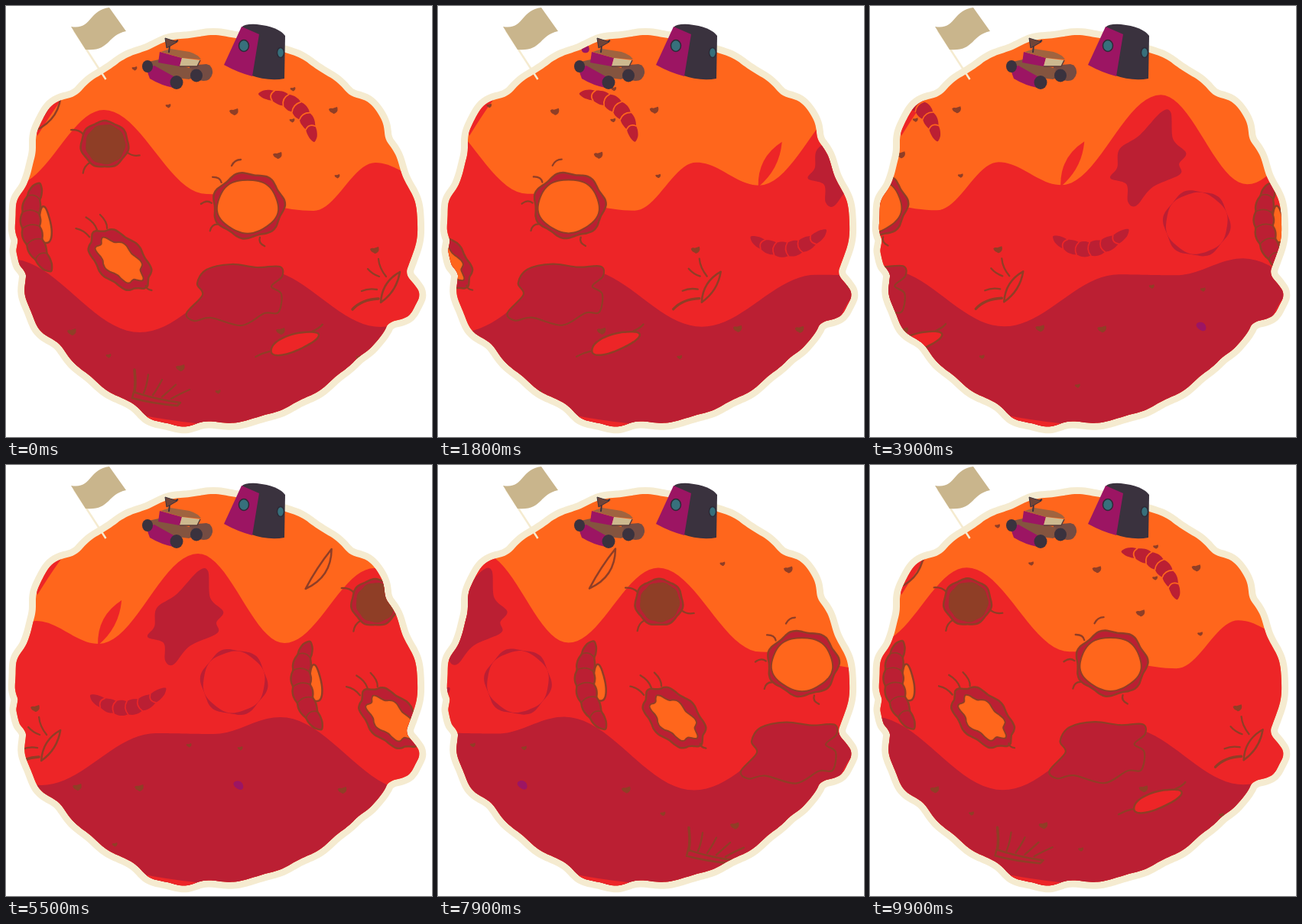
An HTML page that plays this animation: 557 px wide and 564 px high, repeating every 10 s.

```html
<!DOCTYPE html>
<html lang="en">
<head>
<meta charset="utf-8">
<title>Red planet</title>
<style>
  html, body { margin: 0; width: 100%; height: 100%; overflow: hidden; background: #fff; }
  svg { display: block; width: 557px; height: 564px; }
</style>
</head>
<body>
<svg viewBox="0 0 557 564">
  <defs><clipPath id="globe"></clipPath></defs>
  <g id="rim"></g>
  <g clip-path="url(#globe)">
    <rect width="557" height="564" fill="#ff661c"/>
    <g id="bands"></g>
    <g fill="#ed2527">
      <path d="M76 118Q62 136 41 170L30 130Z"/>
      <path d="M552 368Q532 388 523 416L557 416Z"/>
      <path d="M170 534Q210 542 248 546L246 564L170 560Z"/>
    </g>
    <g id="land"></g>
  </g>
  <g id="flag">
    <path d="M89 32L130.500 96" stroke="#f5ebd0" stroke-width="2.500"/>
    <path d="M85 27C112 32 108 5 135 2L157 33C132 38 136 60 104 57Z" fill="#c9b58c"/>
  </g>
  <g id="pod">
    <path d="M308 28Q312 23 328 24Q356 27 365 39L364 95Q343 99 318 90Z" fill="#3a323e"/>
    <path d="M308 27L331 37L322 92Q303 87 285 77Z" fill="#9c1563"/>
    <g fill="#37707c" stroke="#2e2a36" stroke-width="1.500">
      <ellipse cx="311" cy="52" rx="6.500" ry="7.500"/>
      <ellipse cx="359" cy="61" rx="4.500" ry="6.500"/>
    </g>
  </g>
  <g id="rover">
    <path d="M240 78L262 76Q271 78 270 88Q268 98 258 98L240 95Z" fill="#744c43"/>
    <path d="M186 73L200 70L243 82L240 96L222 94L190 80Z" fill="#84543f"/>
    <path d="M183 81L194 78L219 92L219 107Q203 104 188 95Z" fill="#9c1563"/>
    <path d="M201 60L230 68L227 79L199 74Z" fill="#9c1563"/>
    <path d="M202 60L215 56L240 60Q252 64 255 70L230 68Z" fill="#a0633f"/>
    <path d="M230 68L254 71L250 79L227 79Z" fill="#cdb98f"/>
    <path d="M227 79L250 79L254 71" stroke="#5b3b38" stroke-width="1.500" fill="none"/>
    <g fill="#3a323e">
      <ellipse cx="185" cy="79" rx="7" ry="8"/>
      <ellipse cx="223" cy="100" rx="8.500" ry="9"/>
      <ellipse cx="249" cy="91" rx="8" ry="8.500"/>
    </g>
    <path d="M213 61L214 51L225 45" stroke="#3a323e" stroke-width="2" fill="none"/>
    <path d="M208 42L224 47L210 55Z" fill="#704438" stroke="#3a323e"/>
  </g>
</svg>
<script>
const RED = '#ed2527', DARK = '#bb1f33', BROWN = '#8f3e26', ORANGE = '#ff661c', CREAM = '#f5ebd0', PURPLE = '#9c1563';
const LOOP = 10000, STEP = 100, STEP_X = 8.07, STEP_Y = 0.018, PERIOD = 797.5;
const { sin, cos, abs, exp, hypot, PI } = Math;
const RAD = PI / 180;
const $ = id => document.getElementById(id);
const range = (n, fn) => Array.from({ length: n }, (_, i) => fn(i));

function add(parent, tag, attrs) {
  const el = document.createElementNS('http://www.w3.org/2000/svg', tag);
  for (const k in attrs) el.setAttribute(k, attrs[k]);
  return parent.appendChild(el);
}

// Closed Catmull-Rom curve
function loop(p) {
  const at = i => p[(i + p.length) % p.length];
  return 'M' + p[0] + p.map((b, i) => {
    const a = at(i - 1), c = at(i + 1), e = at(i + 2);
    const h = [0, 1].map(k => b[k] + (c[k] - a[k]) / 6);
    const j = [0, 1].map(k => c[k] - (e[k] - b[k]) / 6);
    return `C${h} ${j} ${c}`;
  }).join('') + 'Z';
}

// Planet: a circle with flat-topped bumps [degrees, height, half width]
const bumps = [[-36, 12, 7], [-12, 7, 16], [2, 11, 13], [20.5, 31, 6], [33, 8, 7], [82, 2, 8],
  [103.5, 10, 8], [155, 11, 9], [172, 8, 4], [184, 9, 7], [214, 15, 8.5], [268, 3, 16]];
const edge = loop(range(240, i => {
  const deg = i * 1.5 - 60;
  const r = bumps.reduce((sum, [at, h, w]) => sum + h * exp(-(((deg - at) / w) ** 4)), 251 + sin(deg * RAD * 27));
  return [271 + r * cos(deg * RAD), 293 + r * sin(deg * RAD)];
}));
add($('rim'), 'path', { d: edge, fill: CREAM, stroke: CREAM, 'stroke-width': 18, 'stroke-linejoin': 'round' });
add($('globe'), 'path', { d: edge });

// Rolling band: cosine easing between its peaks and troughs
function band(fill, keys) {
  const all = [-1, 0, 1, 2].flatMap(k => keys.map(([x, y]) => [x + k * PERIOD, y]));
  let d = `M${all[0]}`;
  for (let i = 1; i < all.length; i++) {
    const [x0, y0] = all[i - 1], [x1, y1] = all[i];
    for (let t = 0.05; t < 1.01; t += 0.05)
      d += `L${x0 + (x1 - x0) * t} ${y0 + (y1 - y0) * (1 - cos(PI * t)) / 2}`;
  }
  add($('bands'), 'path', { d: d + 'V700H-800Z', fill });
}
band(RED, [[10.5, 234], [128, 136], [262, 246], [402, 268], [483, 205], [565, 235], [695, 117]]);
band(DARK, [[5, 331], [175, 427], [335, 345], [490, 420], [640, 352], [715, 353]]);

const tile = add($('land'), 'g', { id: 'tile', 'stroke-linecap': 'round', 'stroke-linejoin': 'round' });
const draw = (d, fill, stroke = 'none', w = 2.5) => add(tile, 'path', { d, fill, stroke, 'stroke-width': w });
const line = (d, w = 2.3, stroke = BROWN) => draw(d, 'none', stroke, w);

// Point on a turned ellipse, k times its size
function around([cx, cy, rx, ry, turn = 0], deg, k = 1) {
  const x = rx * k * cos(deg * RAD), y = ry * k * sin(deg * RAD), c = cos(turn * RAD), s = sin(turn * RAD);
  return [cx + x * c - y * s, cy + x * s + y * c];
}

function blob(oval, lobes, rough, phase, fill, stroke, w) {
  draw(loop(range(36, i => around(oval, i * 10, 1 + rough * sin(lobes * i * 10 * RAD + phase)))), fill, stroke, w);
}

// Short bent cracks around a crater
function cracks(oval, angles, from, to) {
  for (const a of angles)
    line(`M${around(oval, a, from)}Q${around(oval, a + 5, (from + to) / 2)} ${around(oval, a - 2, to)}`);
}

// Pointed slit from a to b
function leaf([ax, ay], [bx, by], left, right, fill, stroke) {
  const n = hypot(bx - ax, by - ay), nx = (by - ay) / n, ny = (ax - bx) / n;
  const ctrl = k => [(ax + bx) / 2 + nx * k, (ay + by) / 2 + ny * k];
  draw(`M${[ax, ay]}Q${ctrl(-left)} ${[bx, by]}Q${ctrl(right)} ${[ax, ay]}Z`, fill, stroke);
}

// Segmented body swept along a quadratic spine
function grub(a, b, c, half, stroke, seam) {
  const side = (t, s) => {
    const [x, y] = [0, 1].map(k => (1 - t) ** 2 * a[k] + 2 * t * (1 - t) * b[k] + t * t * c[k]);
    const [dx, dy] = [0, 1].map(k => (1 - t) * (b[k] - a[k]) + t * (c[k] - b[k]));
    const w = s * half * sin(PI * t) ** 0.4 * (0.88 + 0.15 * abs(sin(PI * 6 * t))) / hypot(dx, dy);
    return [x - dy * w, y + dx * w];
  };
  const ts = range(25, i => i / 24);
  draw(loop([...ts.map(t => side(t, 1)), ...ts.slice(1, -1).reverse().map(t => side(t, -1))]), DARK, stroke);
  for (let t = 1 / 6; t < 0.9; t += 1 / 6) line(`M${side(t, 1)}Q${side(t - 0.06, 0)} ${side(t, -1)}`, 1.7, seam);
}

// Craters
const brown = [129, 181, 31, 30], pit = [149, 332, 48, 29, 44], big = [317, 261, 46, 42], pool = [376, 441, 33, 11, -20];
blob(brown, 7, 0.03, 0, DARK, BROWN);
blob([130, 181, 26, 26], 9, 0.02, 1, BROWN);
cracks(brown, [20, 128, 206], 1, 1.55);

blob(pit, 8, 0.05, 1, DARK, BROWN);
blob([149, 333, 36, 19, 42], 7, 0.1, 2, ORANGE, BROWN, 2);
cracks(pit, [168, 194, 216], 1.05, 1.5);
cracks(pit, [2], 1, 1.2);

blob(big, 7, 0.045, 2, DARK, BROWN);
blob([316, 262, 40, 35], 5, 0.02, 0, ORANGE, BROWN, 2);
cracks(big, [72, 146, 184, 223], 1.05, 1.35);
line('M295 209Q299 201 307 201');

draw(loop([[262, 345], [295, 338], [328, 342], [358, 341], [361, 354], [347, 367], [360, 377], [356, 401], [338, 402],
  [308, 418], [268, 408], [246, 412], [236, 402], [257, 378], [250, 363]]), DARK, BROWN, 2.2);
blob(pool, 3, 0.06, 1, RED, BROWN);
cracks(pool, [182, 328], 1.02, 1.6);

// Scratched crater: a base with leaning spikes
draw('M167 505Q196 515 228 519L224 523Q190 520 165 513Z', 'none', BROWN);
for (let i = 0; i < 5; i++) {
  const x = 168 + 12 * i, y = 504 + 2.5 * i;
  line(`M${x} ${y}q${2 + i * 2} ${-10 + i} ${i * 6} ${-28 + 4 * i}`, i ? 2.3 : 3.5);
}

// Ribbed crater
leaf([490, 388], [515, 348], 10, 13, 'none', BROWN);
line('M487 331Q488 343 497 354M473 344Q479 351 488 354M465 373Q474 369 485 371');
line('M453 397Q465 384 487 383', 3.4);

// Grubs
blob([51, 288, 8, 24, -5], 3, 0.08, 0, ORANGE, BROWN);
grub([44, 232], [14, 290], [59, 347], 13, BROWN, BROWN);
grub([330, 115], [393, 118], [403, 178], 10, 'none', ORANGE);
grub([554, 302], [602, 340], [653, 293], 10, 'none', RED);

// Ridge, dark patch, ring, slit
leaf([564, 237], [595, 178], 14, 19, RED);
draw(loop([[695, 140], [708, 140], [711, 175], [728, 193], [719, 207], [720, 221], [684, 238], [663, 262], [652, 257],
  [650, 234], [629, 226], [638, 212], [641, 188], [667, 170]]), DARK);
blob([742, 285, 43, 43], 6, 0.04, 0.6, DARK);
blob([742, 285, 40.5, 40], 6, 0.02, 3.7, RED);
leaf([38, 163], [72, 111], 20, 3, 'none', BROWN);

function rocks(size, spots) {
  for (const [x, y] of spots)
    draw('M-6 -2Q-4 -4 -1 -3L5 -5Q7 0 3 3Q0 5 -1 3Q-5 2 -6 -2Z', BROWN)
      .setAttribute('transform', `translate(${x} ${y}) scale(${size})`);
}
rocks(1, [[298, 139], [428, 137], [355, 196], [482, 320], [228, 474], [86, 427], [359, 426], [537, 423], [618, 424]]);
rocks(0.6, [[168, 82], [212, 131], [375, 109], [374, 150], [433, 223], [683, 368], [134, 458], [277, 505], [461, 460], [586, 498], [750, 372]]);
blob([748, 420, 7, 5, 35], 3, 0.05, 0, PURPLE);
blob([338, 56, 5, 6], 3, 0.05, 0, PURPLE);

add($('land'), 'use', { href: '#tile', x: PERIOD });

function frame() {
  const step = Math.floor((performance.now() % LOOP) / STEP);
  const move = `translate(${-step * STEP_X} ${-step * STEP_Y})`;
  $('bands').setAttribute('transform', move);
  $('land').setAttribute('transform', move);
  requestAnimationFrame(frame);
}
frame();
</script>
</body>
</html>
```
